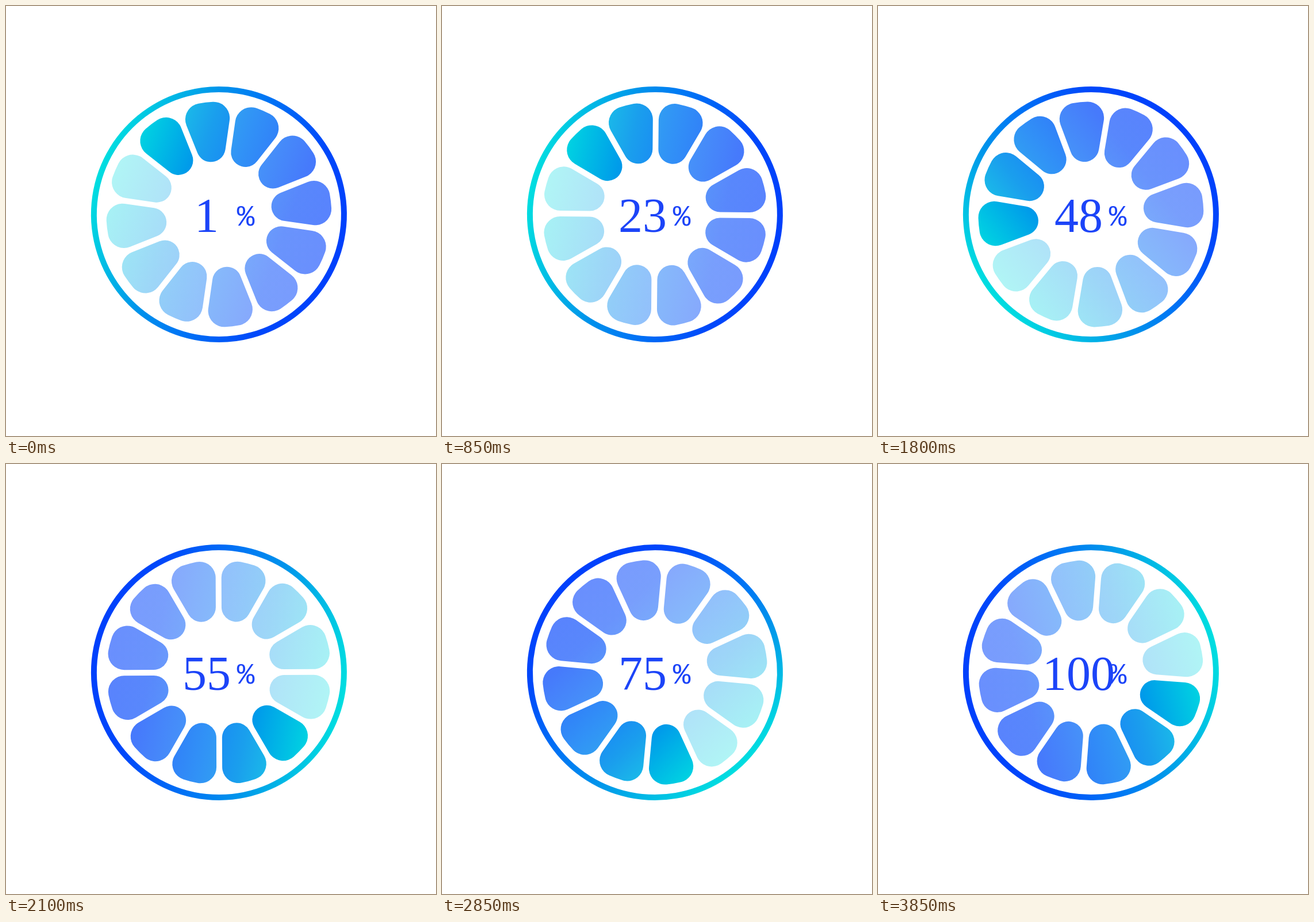
Animation, 748 px wide and 748 px high, one loop 3900 ms. Source, as an HTML page with a canvas:

```html
<!DOCTYPE html>
<html lang="en">
<head>
<meta charset="utf-8">
<title>Citrus loader</title>
<style>
  html, body { margin: 0; width: 100%; height: 100%; overflow: hidden; background: #fff; }
  canvas { display: block; }
</style>
</head>
<body>
<canvas id="stage" width="748" height="748"></canvas>
<script>
const ctx = document.getElementById('stage').getContext('2d');
const CENTER = [370.4, 362.5];
const LOOP = 3900, STEP = 50, RUN = 3823;
const START_ANGLE = -36.8, TURN = -1653.8;
const PETALS = 12, INNER = 92, OUTER = 196, CORNER = 28, HALF_GAP = 5;
const rad = deg => deg * Math.PI / 180;

// Gradient across the whole disc, slightly behind the strongest petal.
function discGradient(radius) {
  const x = -Math.sin(rad(33)) * radius, y = -Math.cos(rad(33)) * radius;
  const g = ctx.createLinearGradient(x, y, -x, -y);
  [[0, '#00dee0'], [0.33, '#0094eb'], [0.5, '#0078f4'], [0.8, '#0048fa'], [1, '#0040fc']]
    .forEach(([at, color]) => g.addColorStop(at, color));
  return g;
}

// Rounded wedge pointing up, bounded by two gaps and the outer circle.
function makePetal() {
  const slant = Math.sin(rad(15));
  const innerY = (INNER - HALF_GAP) / (1 - slant);
  const innerR = innerY - INNER;
  const dist = OUTER - CORNER;
  const tilt = rad(15) - Math.asin((HALF_GAP + CORNER) / dist);
  const x = dist * Math.sin(tilt), y = -dist * Math.cos(tilt);
  const up = rad(270);
  const p = new Path2D();
  p.arc(0, -innerY, innerR, rad(15), rad(165));
  p.arc(-x, y, CORNER, rad(165), up - tilt);
  p.arc(0, 0, OUTER, up - tilt, up + tilt);
  p.arc(x, y, CORNER, up + tilt, rad(375));
  p.closePath();
  return p;
}

// The gradient stays fixed to the disc while the petal path is turned.
const petal = makePetal();
const petals = Array.from({ length: PETALS }, (_, i) => {
  const path = new Path2D();
  path.addPath(petal, new DOMMatrix().rotate(i * 360 / PETALS));
  return { path, alpha: 0.31 ** (i / (PETALS - 1)) };
});
const ringFill = discGradient(222);
const petalFill = discGradient(OUTER);

function drawDisc(angle) {
  ctx.save();
  ctx.translate(...CENTER);
  ctx.rotate(rad(angle));
  ctx.strokeStyle = ringFill;
  ctx.lineWidth = 10;
  ctx.beginPath();
  ctx.arc(0, 0, 217.5, 0, 2 * Math.PI);
  ctx.stroke();
  ctx.fillStyle = petalFill;
  for (const { path, alpha } of petals) {
    ctx.globalAlpha = alpha;
    ctx.fill(path);
  }
  ctx.restore();
}

function drawLabel(text, font, x, y) {
  ctx.font = font;
  ctx.fillText(text, x, y);
}

function render(now) {
  const t = Math.floor((now % LOOP) / STEP) * STEP;
  const progress = Math.min(t / RUN, 1);
  ctx.fillStyle = '#fff';
  ctx.fillRect(0, 0, 748, 748);
  drawDisc(START_ANGLE + TURN * progress);
  ctx.fillStyle = '#1c44f8';
  ctx.textAlign = 'center';
  drawLabel(Math.round(1 + 99 * progress), '84px "Liberation Serif", serif', 349, 393);
  drawLabel('%', '51px "Liberation Mono", monospace', 417, 382);
}

function frame() {
  render(performance.now());
  requestAnimationFrame(frame);
}
frame();
</script>
</body>
</html>
```
